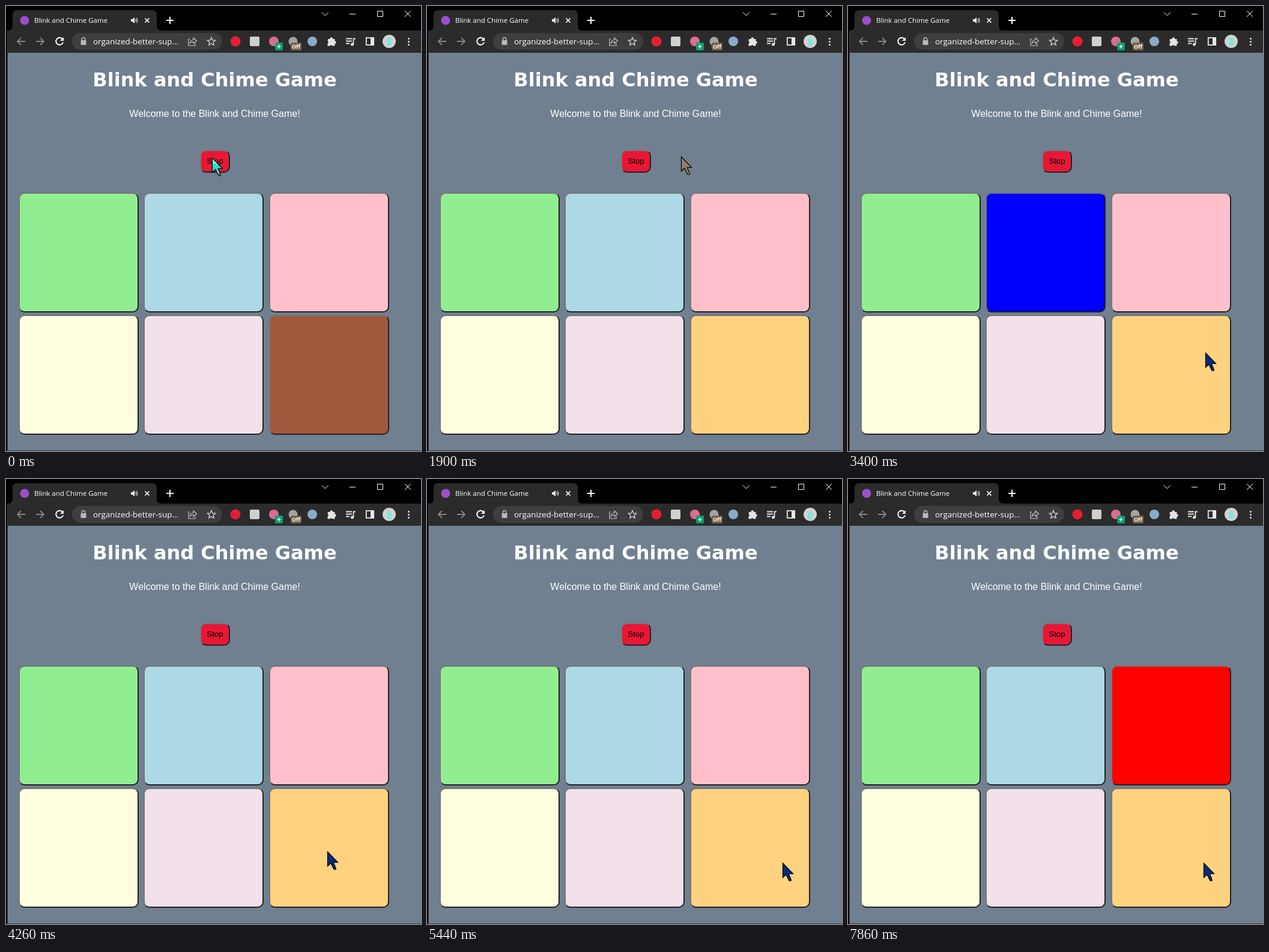
Recreate the animation shown at these times as an HTML page. Size 691 px wide and 742 px high, loop 8 s.

```html
<!DOCTYPE html>
<html lang="en">
<head>
<meta charset="utf-8">
<title>Blink and Chime Game</title>
<style>
  html, body { margin: 0; width: 100%; height: 100%; overflow: hidden; background: #000; }
  #stage { position: relative; width: 691px; height: 742px; overflow: hidden; background: #000; }
  #stage > * { position: absolute; }
  #bar { left: 0; top: 0; }
  #page { left: 3px; top: 78px; width: 688px; height: 663px; background: #708090; }
  .ui { font-family: "Open Sans", sans-serif; fill: #fff; }
  .title { font: bold 32px "DejaVu Sans", sans-serif; }
  .lead { font: 16px "Liberation Sans", Arial, sans-serif; }
  .title, .lead { left: 0; width: 695px; text-align: center; color: #fff; white-space: nowrap; }
  .btn {
    box-sizing: border-box; border: 2px solid; border-radius: 10px;
    border-color: #767676 #222 #222 #767676;
  }
  .btn.down { border-color: #222 #767676 #767676 #222; }
  .tile { width: 200px; height: 200px; }
  #stop {
    left: 323px; top: 240px; width: 50px; height: 38px; background: #e81736; color: #000;
    font: 13.333px/34px "Liberation Sans", Arial, sans-serif; text-align: center;
  }
  .cursor { left: 0; top: 0; overflow: visible; }
  .invert { mix-blend-mode: difference; }
</style>
</head>
<body>
<div id="stage">
  <svg id="bar" width="691" height="742" fill="none">
    <path d="M3 41H691V78H3Z" fill="#2b2b2b"/>
    <path d="M3 41Q11 41 11 33V15Q11 7 19 7H243Q251 7 251 15V33Q251 41 259 41Z" fill="#2b2b2b"/>
    <path d="M2.5 41V742M2 741.5H691" stroke="#3a3d40"/>
    <rect x="110" y="45" width="250" height="28" rx="14" fill="#3e3e3e"/>

    <circle cx="31" cy="24" r="7.5" fill="#9a4fc8"/>
    <text class="ui" x="47" y="28" font-size="11.5">Blink and Chime Game</text>
    <path d="M208 22H210.5L214 19V29L210.5 26H208Z" fill="#fff"/>
    <path d="M215.8 21.3Q217.6 24 215.8 26.7M217.7 19.7Q220.5 24 217.7 28.3" stroke="#fff"/>
    <path d="M231.5 20.5L238.5 27.5M238.5 20.5L231.5 27.5" stroke="#fff" stroke-width="1.7"/>
    <path d="M267 24H279M273 18V30" stroke="#fff" stroke-width="2"/>
    <path d="M526 10.500L531.500 16L537 10.500M572 13.500H582M618.500 8.500H627.500V17.500H618.500ZM664 8L674 18M674 8L664 18" stroke="#fff"/>

    <path d="M32 59H19M25 53L19 59L25 65M50 59H63M57 53L63 59L57 65" stroke="#858585" stroke-width="1.8"/>
    <path d="M94.300 55.500A6 6 0 1 0 95 60.500" stroke="#fff" stroke-width="2"/>
    <path d="M96 52V58H90Z" fill="#fff"/>

    <rect x="124.500" y="57" width="9" height="8" rx="1" fill="#b8b8b8"/>
    <path d="M126.300 57V55.500A2.700 2.700 0 0 1 131.700 55.500V57" stroke="#b8b8b8" stroke-width="1.5"/>
    <text class="ui" x="145" y="64" font-size="13.4">organized-better-sup...</text>
    <path d="M306 55H304V66H315V62M306.500 62Q307 56.500 312 56.500V53L317.500 58L312 62.500V59.500Q308.500 59.500 306.500 62Z" stroke="#c4c4c4" stroke-width="1.2"/>
    <path id="star" stroke="#d0d0d0" stroke-width="1.4"/>

    <circle cx="382" cy="59" r="8.500" fill="#e41f35"/>
    <rect x="406" y="51" width="16" height="16" rx="2" fill="#cfcfcf"/>
    <circle cx="446" cy="59" r="8" fill="#dc6c8e"/>
    <rect x="448" y="61" width="13" height="13" rx="2" fill="#0b9f72"/>
    <path d="M451.500 67.500H457.500M454.500 64.500V70.500" stroke="#fff" stroke-width="1.5"/>
    <circle cx="478" cy="59" r="7.500" fill="#a3a3a3"/>
    <rect x="474" y="61" width="18" height="13" rx="2" fill="#766449"/>
    <text class="ui" x="483" y="71" font-size="9" font-weight="700" text-anchor="middle">Off</text>
    <circle cx="510" cy="59" r="8" fill="#88abc8"/>
    <path d="M536 55H539.500A2.300 2.300 0 1 1 544 55H547.500V58.500A2.200 2.200 0 1 1 547.500 63V66.500H543.500A2.200 2.200 0 0 0 539.500 66.500H535.500V62.500A2.200 2.200 0 0 0 535.500 58.500Z" fill="#e4e4e4"/>
    <path d="M566 54.500H576M566 58.500H576M566 62.500H572M578.500 64V54.500H582" stroke="#e4e4e4" stroke-width="1.800"/>
    <circle cx="576.500" cy="64" r="2.500" fill="#e4e4e4"/>
    <rect x="599.800" y="53" width="12.400" height="12" stroke="#e8e8e8" stroke-width="1.800"/>
    <path d="M607 53H612V65H607Z" fill="#e8e8e8"/>
    <circle cx="638" cy="59" r="11" fill="#d5d1d0"/>
    <path d="M634 67V57Q634 53 639 53Q643 54 642 59V67Z" fill="#83e5db"/>
    <path d="M670.500 54.500V54.600M670.500 59.500V59.600M670.500 64.500V64.600" stroke="#e8e8e8" stroke-width="3" stroke-linecap="round"/>
  </svg>
  <div id="page"></div>
  <div class="title" style="top:104px;line-height:38px">Blink and Chime Game</div>
  <div class="lead" style="top:171px;line-height:18px">Welcome to the Blink and Chime Game!</div>
  <div id="stop" class="btn">Stop</div>
</div>
<script>
const LOOP = 8000;
const stage = document.getElementById('stage');

document.getElementById('star').setAttribute('d', 'M' + Array.from({ length: 10 }, (_, i) => {
  const r = i % 2 ? 3.2 : 7, a = i * Math.PI / 5;
  return (342 + r * Math.sin(a)).toFixed(2) + ' ' + (59.5 - r * Math.cos(a)).toFixed(2);
}).join('L') + 'Z');

// lit and down hold [from, to] spans in ms
const tiles = [
  { color: '#90ee90' },
  { color: '#add8e6', glow: '#0000ff', lit: [[3400, 4110], [6930, 7460]], down: [[4780, 4930]] },
  { color: '#ffc0cb', glow: '#ff0000', lit: [[7860, 8000]] },
  { color: '#ffffe0' },
  { color: '#f2e0ea' },
  { color: '#ffd280', glow: '#a2583d', lit: [[0, 250], [2210, 3000], [5870, 6400]],
    down: [[1110, 1230], [4540, 4660]] }
];

// time, x, y of the pointer tip
const moves = [
  [0, 343, 253], [810, 492, 449], [960, 529, 589],
  [1540, 524, 545], [1660, 486, 415], [1780, 436, 284], [1900, 423, 251],
  [2490, 429, 270], [2610, 434, 294], [2760, 525, 445], [2880, 588, 553], [3000, 595, 578],
  [3960, 533, 636], [4110, 533, 629], [4260, 535, 621],
  [4660, 500, 572], [4780, 358, 391],
  [5050, 623, 613], [5200, 611, 632], [5320, 598, 642], [5440, 592, 640]
];

tiles.forEach((tile, i) => {
  tile.el = document.createElement('div');
  tile.el.style.left = [21, 229, 438][i % 3] + 'px';
  tile.el.style.top = (i < 3 ? 311 : 515) + 'px';
  stage.append(tile.el);
});

const arrow = 'M.5 .5V24.5L5.8 19.5L11 30H14.200V27.800L10.200 18.200H17.500Z';
const layer = (name, paint) => stage.insertAdjacentHTML('beforeend',
  `<svg class="cursor ${name}" width="18" height="31"><path d="${arrow}" ${paint}/></svg>`);
layer('invert', 'fill="#fff"');
layer('', 'fill="none" stroke="#000" stroke-width="1.2"');
const cursor = stage.querySelectorAll('.cursor');

const within = (spans = [], t) => spans.some(([from, to]) => t >= from && t < to);

function draw(t) {
  for (const { el, color, glow, lit, down } of tiles) {
    const held = within(down, t);
    el.className = held ? 'btn tile down' : 'btn tile';
    el.style.background = held || within(lit, t) ? glow : color;
  }
  const [, x, y] = moves.findLast(m => m[0] <= t);
  cursor.forEach(c => { c.style.left = x + 'px'; c.style.top = y + 'px'; });
}

const start = performance.now();
function tick() {
  draw((performance.now() - start) % LOOP);
  requestAnimationFrame(tick);
}
tick();
</script>
</body>
</html>
```
